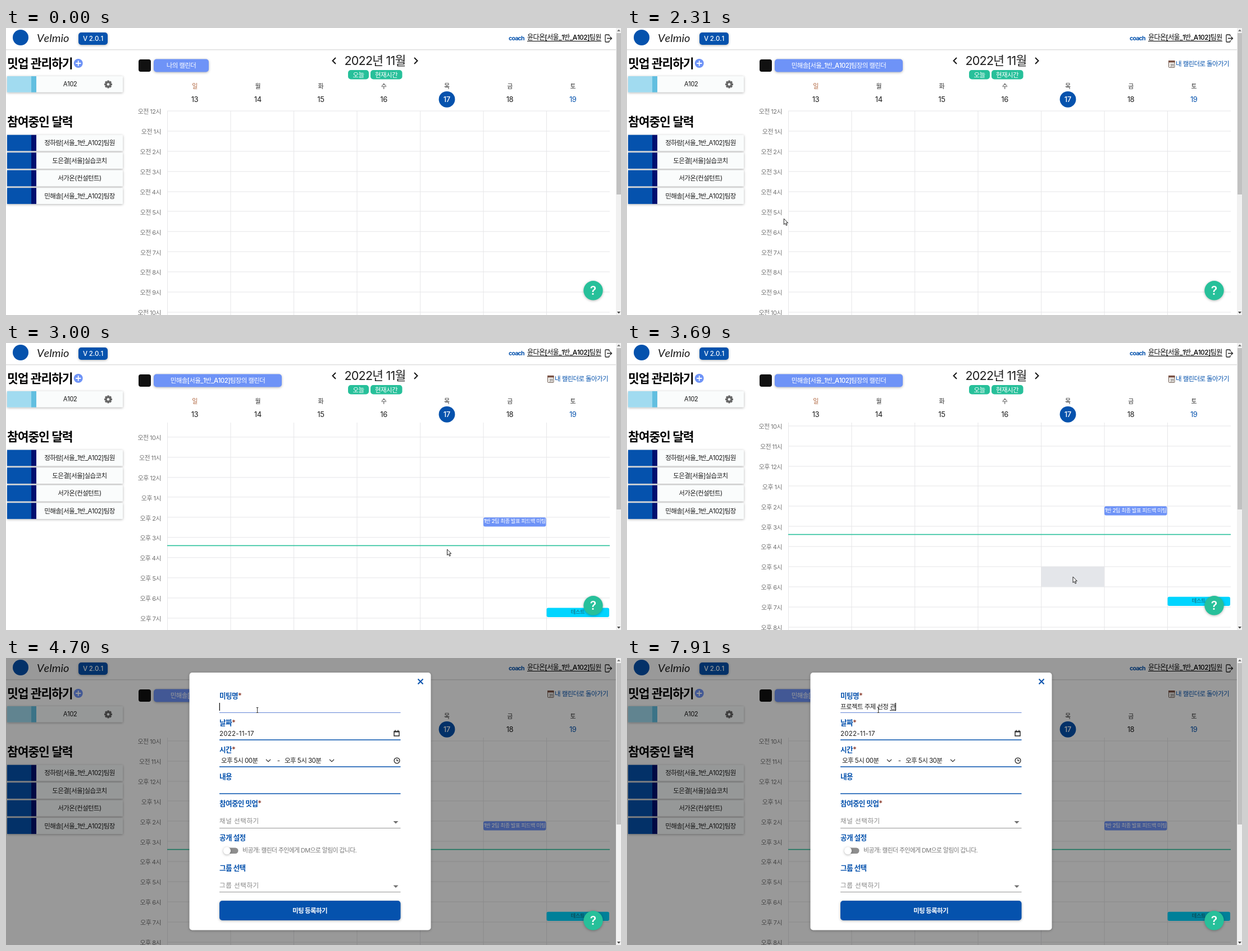
An HTML page that plays this animation: 1095 by 512 pixels, repeating every 8000 ms.

```html
<!DOCTYPE html>
<html lang="ko">
<head>
<meta charset="utf-8">
<title>Calendar booking</title>
<style>
  html, body { margin: 0; width: 100%; height: 100%; overflow: hidden; background: #fff; }
  svg { display: block; width: 1095px; height: 512px; }
  text { font-family: Inter, "Noto Sans CJK KR", "Noto Sans CJK", sans-serif; font-kerning: none; white-space: pre; }
  .lift { filter: drop-shadow(0 1px 2px rgba(0, 0, 0, .3)); }
</style>
</head>
<body>
<svg id="stage" viewBox="0 0 1095 512"></svg>
<script>
const BLUE = '#0552ad', SKY = '#6e93f7', GREEN = '#27c09a', INK = '#1c1c1c';
const TOP = 148, ROW = 35.88, COL = 112.5, LEFT = 287.5;
const LOOP = 8000;

// Markup helpers; text is placed by its vertical centre.
const text = (x, y, str, { size = 11.5, fill = INK, anchor = 'middle', weight = 400, gap = -.05, more = '' } = {}) =>
  `<text x="${x}" y="${y + size * .37}" font-size="${size}" fill="${fill}" text-anchor="${anchor}"
    font-weight="${weight}" letter-spacing="${gap * size}" ${more}>${str}</text>`;
const rect = (x, y, w, h, fill, r = 0, more = '') =>
  `<rect x="${x}" y="${y}" width="${w}" height="${h}" rx="${r}" fill="${fill}" ${more}/>`;
const circle = (x, y, r, fill, more = '') => `<circle cx="${x}" cy="${y}" r="${r}" fill="${fill}" ${more}/>`;
const line = (d, color, width = 1, more = '') =>
  `<path d="${d}" fill="none" stroke="${color}" stroke-width="${width}" ${more}/>`;
const group = (id, body, more = '') => `<g id="${id}" ${more}>${body}</g>`;
const range = n => [...Array(n).keys()];
const LIFT = 'class="lift"';

function header() {
  return rect(0, 0, 1086, 38, '#fff') + rect(0, 38, 1086, 1, '#dedede') + rect(0, 39, 1086, 1, '#efefef') +
    circle(26, 17, 14, BLUE) +
    `<text x="55" y="25" font-size="20" font-style="italic" style="font-family:Lato,sans-serif" fill="${INK}">Velmio</text>` +
    rect(129, 8, 52, 22, BLUE, 5, LIFT) +
    text(155, 18.5, 'V 2.0.1', { fill: '#fff', weight: 500, gap: -.02 }) +
    text(895, 18, 'coach', { size: 10.5, fill: BLUE, weight: 700, anchor: 'start', gap: -.07 }) +
    text(928, 17, '윤다온[서울_1반_A102]팀원', { size: 12, weight: 500, anchor: 'start', fill: '#000' }) +
    rect(928, 23, 132, 1, '#000') +
    line('M1074 15v-2q0-1-1-1h-5q-1 0-1 1v11q0 1 1 1h5q1 0 1-1v-2M1070 18.5h8.5m-3-3l3 3l-3 3', '#222', 1.3);
}

function gear(x, y) {
  const teeth = range(4).map(i => rect(x - 1.8, y - 7, 3.6, 14, '#666', .8, `transform="rotate(${i * 45} ${x} ${y})"`));
  return teeth.join('') + circle(x, y, 5.3, '#666') + circle(x, y, 2.3, '#fafcfc');
}

function sidebar() {
  const card = (y, main, edge, x, label) =>
    rect(2, y, 206, 28.7, '#fafcfc', 1, LIFT) + rect(2, y, 43, 28.7, main) + rect(45, y, 9, 28.7, edge) +
    text(x, y + 14.2, label);
  const title = (y, label) => text(2, y, label, { size: 21.5, weight: 600, anchor: 'start', fill: '#000' });
  const people = ['정하람[서울_1반_A102]팀원', '도은결[서울]실습코치', '서가온(컨설턴트)', '민해솔[서울_1반_A102]팀장'];
  return title(63, '밋업 관리하기') + circle(128.7, 63, 8, SKY) + line('M124 63h9.4M128.7 58.3v9.4', '#fff', 1.8) +
    card(86, '#a1dbf0', '#62bfe0', 114, 'A102') + gear(182, 100.5) +
    title(167, '참여중인 달력') +
    people.map((name, i) => card(190.7 + i * 31.5, BLUE, '#000f70', 131, name)).join('');
}

function toolbar() {
  const white = { fill: '#fff', weight: 500 };
  return rect(236, 56, 22, 22, '#111', 4) +
    group('mine', rect(263, 55.5, 98, 23, SKY, 5, LIFT) + text(312, 67, '나의 캘린더', white)) +
    group('theirs', rect(263, 55.5, 228, 23, SKY, 5, LIFT) + text(377, 67, '민해솔[서울_1반_A102]팀장의 캘린더', white) +
      rect(964.5, 58.5, 10.5, 12, '#f4f0ec', 1, 'stroke="#6b5a50"') + rect(964, 58, 11.5, 3.5, '#7a5244') +
      text(970, 66.5, '31', { size: 6.5, fill: '#333' }) +
      text(977, 64, '내 캘린더로 돌아가기', { fill: BLUE, weight: 500, anchor: 'start' })) +
    line('M587 53l-5.5 5.5l5.5 5.5M727 53l5.5 5.5l-5.5 5.5', '#111', 1.9) +
    text(657, 58, '2022년 11월', { size: 21.5, gap: -.035 }) +
    rect(609, 75, 37, 16.5, GREEN, 5) + text(627.5, 83.3, '오늘', white) +
    rect(649, 75, 56.5, 16.5, GREEN, 5) + text(677, 83.3, '현재시간', white);
}

function weekdays() {
  return [...'일월화수목금토'].map((day, i) => {
    const x = 336 + i * 112.2, today = i === 4;
    return text(x, 104, day, { size: 11, fill: i === 0 ? '#b0663f' : '#333' }) +
      (today ? circle(785, 127.3, 14.4, BLUE) : '') +
      text(x, 127, 13 + i, { size: 13, fill: today ? '#fff' : i === 6 ? BLUE : INK, weight: today ? 500 : 400, gap: -.03 });
  }).join('');
}

function calendar() {
  const at = hour => TOP + hour * ROW;
  const rows = range(25).map(h => {
    const label = `${h < 12 ? '오전' : '오후'} ${h % 12 || 12}시`;
    return rect(LEFT - .5, Math.round(at(h)) - .5, 788, 1, '#e6e6e8') +
      (h < 24 ? text(276, at(h) + 1.3, label, { size: 11, fill: '#747474', anchor: 'end' }) : '');
  });
  const cols = range(7).map(i => rect(LEFT - .5 + i * COL, TOP, 1, ROW * 24, '#e6e6e8'));
  return group('hover', rect(737.5, at(17), 112.5, ROW, '#e4e6ea')) + rows.join('') + cols.join('') +
    group('events', rect(287, 699.8, 788, 1.6, GREEN) +
      rect(850, at(14), 111.5, 16.3, SKY, 3) +
      text(905.7, at(14) + 6.8, '1반 2팀 최종 발표 피드백 미팅', { size: 9.5, fill: '#fff', weight: 500 }) +
      rect(962.5, at(18.5), 111.5, 16.3, '#00d5ff', 3) +
      text(1018, at(18.5) + 6.8, '테스트', { size: 9.3, fill: '#17606f' }));
}

function modal() {
  const field = (y, label, star) => text(380, y,
    label + (star ? '<tspan fill="#8b3a2a">*</tspan>' : ''), { size: 12.6, weight: 600, fill: BLUE, anchor: 'start' });
  const value = (x, y, str, o) => text(x, y, str, { anchor: 'start', ...o });
  const pick = { fill: '#868686', gap: .05 };
  const rule = (y, color, h = 1.5, more = '') => rect(380, y, 322.5, h, color, 0, more);
  const arrow = y => `<path d="M689.5 ${y}h9l-4.5 4.5z" fill="#707070"/>`;
  return rect(326.5, 26, 430, 459.5, '#fff', 5, LIFT) +
    line('M733.5 37.5l9 9m0-9l-9 9', BLUE, 2) +
    field(67, '미팅명', 1) + rule(97, BLUE, 1, 'id="focusRule"') +
    field(115, '날짜', 1) + value(380, 134.7, '2022-11-17', { gap: .02 }) + rule(145.3, BLUE) +
    line('M691 131h9v8h-9zM691 131.8h9M693 128.5v2M698 128.5v2', '#222', 1.4) +
    field(163, '시간', 1) + value(383, 183, '오후 5시 00분', { gap: -.045 }) + text(485, 183, '-') +
    value(496, 183, '오후 5시 30분', { gap: -.045 }) +
    line('M463 181l4 4l4-4M576 181l4 4l4-4', '#333', 1.2) +
    circle(696, 183, 4.9, 'none', 'stroke="#222" stroke-width="1.3"') + line('M696 180v3.3h2.8', '#222', 1.2) + rule(193.3, BLUE) +
    field(211, '내용') + rule(241.3, BLUE) +
    field(259, '참여중인 밋업', 1) + value(380, 291, '채널 선택하기', pick) + arrow(291) + rule(303, '#949494', 1) +
    field(320, '공개 설정') + rect(389, 338.5, 24.5, 10.5, '#8e8e8e', 5.2) + circle(393.5, 343.8, 6.6, '#fff', LIFT) +
    value(421, 343, '비공개: 캘린더 주인에게 DM으로 알림이 갑니다.', { size: 10.8, fill: '#777' }) +
    field(374, '그룹 선택') + value(380, 406, '그룹 선택하기', pick) + arrow(405.5) + rule(417, '#949494', 1) +
    rect(380, 433, 322.5, 35, BLUE, 5, LIFT) + text(541, 450.7, '미팅 등록하기', { fill: '#fff', weight: 700 }) +
    value(380, 86.7, '', { more: 'id="entry"' }) +
    rect(380, 93, 10, 1, '#222', 0, 'id="composing"') + rect(379.7, 80, 1.2, 14, '#000', 0, 'id="caret"');
}

function scrollbar() {
  return rect(1086, 0, 9, 512, '#f1f1f1') + rect(1087, 9, 8, 288, '#c1c1c1') +
    '<path d="M1088 6l3-3.5l3 3.5z" fill="#777"/><path d="M1088 506l3 3.5l3-3.5z" fill="#444"/>';
}

function pointers() {
  const outline = 'fill="#fff" stroke="#222" stroke-width="1" stroke-linejoin="round"';
  return group('arrow', `<path d="M0 0v10.5l2.4-2.1 1.7 3.8 1.7-.8-1.7-3.7h3.2z" ${outline}/>`) +
    group('hand', `<path d="M-1 1q1-2 2 0v5l5 1q1.5 1 1 3l-1 4.5h-6l-4-5.5q1-1.5 3 .5z" ${outline}/>`) +
    group('beam', line('M-1.8-4.5h3.6M0-4.5v9M-1.8 4.5h3.6', '#333'));
}

const stage = document.getElementById('stage');
stage.innerHTML =
  `<clipPath id="view"><rect y="142" width="1086" height="370"/></clipPath>` +
  rect(0, 0, 1095, 512, '#fff') + header() + sidebar() + toolbar() + weekdays() +
  `<g clip-path="url(#view)">${group('grid', calendar())}</g>` +
  rect(0, 0, 1086, 512, '#000', 0, 'id="shade"') + group('modal', modal()) +
  circle(1045.5, 468.3, 17.2, GREEN, LIFT) + text(1045.5, 468.3, '?', { size: 21, fill: '#fff', weight: 600, gap: 0 }) +
  scrollbar() + pointers();

const el = id => document.getElementById(id);
const show = (id, on) => el(id).setAttribute('visibility', on ? 'inherit' : 'hidden');
const clamp = v => Math.min(1, Math.max(0, v));

// Linear interpolation through [time, ...values] keys.
function track(keys, t) {
  const i = keys.findIndex(k => k[0] > t);
  if (i === 0) return keys[0].slice(1);
  if (i < 0) return keys.at(-1).slice(1);
  const [a, b] = [keys[i - 1], keys[i]], p = (t - a[0]) / (b[0] - a[0]);
  return a.slice(1).map((v, n) => v + (b[n + 1] - v) * p);
}

const MOUSE = [
  [200, 615, 492], [560, 107, 112], [950, 117, 280], [1020, 118, 286], [1430, 119, 291], [2240, 119, 291],
  [2310, 277.5, 340], [2580, 770, 360], [3000, 785.5, 368], [3280, 790, 380], [3600, 794, 417], [3930, 794, 417],
  [4300, 600, 215], [4690, 447.5, 93]
];
const SCROLL = [[2560, 0], [2760, 150], [2900, 275], [3000, 339], [3070, 350], [3210, 359]];
const TYPED = [
  [5370, 'ㅍ'], [5510, '프'], [5770, '플'], [5850, '프로'], [5930, '프롲'], [6010, '프로제'], [6090, '프로젝'],
  [6310, '프로젝ㅌ'], [6370, '프로젝트'], [6510, '프로젝트 '], [6770, '프로젝트 ㅈ'], [6840, '프로젝트 주'],
  [6900, '프로젝트 줒'], [6970, '프로젝트 주제'], [7040, '프로젝트 주제 '], [7100, '프로젝트 주제 ㅅ'],
  [7170, '프로젝트 주제 서'], [7370, '프로젝트 주제 선'], [7440, '프로젝트 주제 선저'], [7510, '프로젝트 주제 선정'],
  [7580, '프로젝트 주제 선정 '], [7780, '프로젝트 주제 선정 ㄱ'], [7840, '프로젝트 주제 선정 과'], [7910, '프로젝트 주제 선정 관']
];

function drawEntry(t) {
  const typed = TYPED.findLast(([at]) => at <= t)?.[1] ?? '';
  const entry = el('entry');
  if (entry.textContent !== typed) entry.textContent = typed;
  const end = 380 + (typed ? entry.getComputedTextLength() : 0);
  el('caret').setAttribute('x', end - .3);
  el('composing').setAttribute('x', end - 10);
  show('composing', typed && !typed.endsWith(' '));
  show('caret', t >= 4700 && (t < 5170 || t >= 5370));
  el('focusRule').setAttribute('fill', t >= 4700 ? '#6385d6' : BLUE);
}

function drawPointer(t) {
  const [x, y] = track(MOUSE, t);
  const kind = t < 200 ? '' : t >= 1090 && t < 2270 ? 'hand' : t >= 4640 ? 'beam' : 'arrow';
  for (const id of ['arrow', 'hand', 'beam']) show(id, id === kind);
  if (kind) el(kind).setAttribute('transform', `translate(${x} ${y})`);
}

function draw() {
  const t = performance.now() % LOOP;
  const visiting = t >= 1780, open = clamp((t - 3700) / 190);
  show('mine', !visiting);
  show('theirs', visiting);
  show('events', visiting);
  show('hover', t >= 3350 && t < 3760);
  el('grid').setAttribute('transform', `translate(0 ${-track(SCROLL, t)[0]})`);
  el('shade').setAttribute('opacity', open * .4);
  el('modal').setAttribute('opacity', open);
  show('modal', open > 0);
  drawEntry(t);
  drawPointer(t);
  requestAnimationFrame(draw);
}
draw();
</script>
</body>
</html>
```
